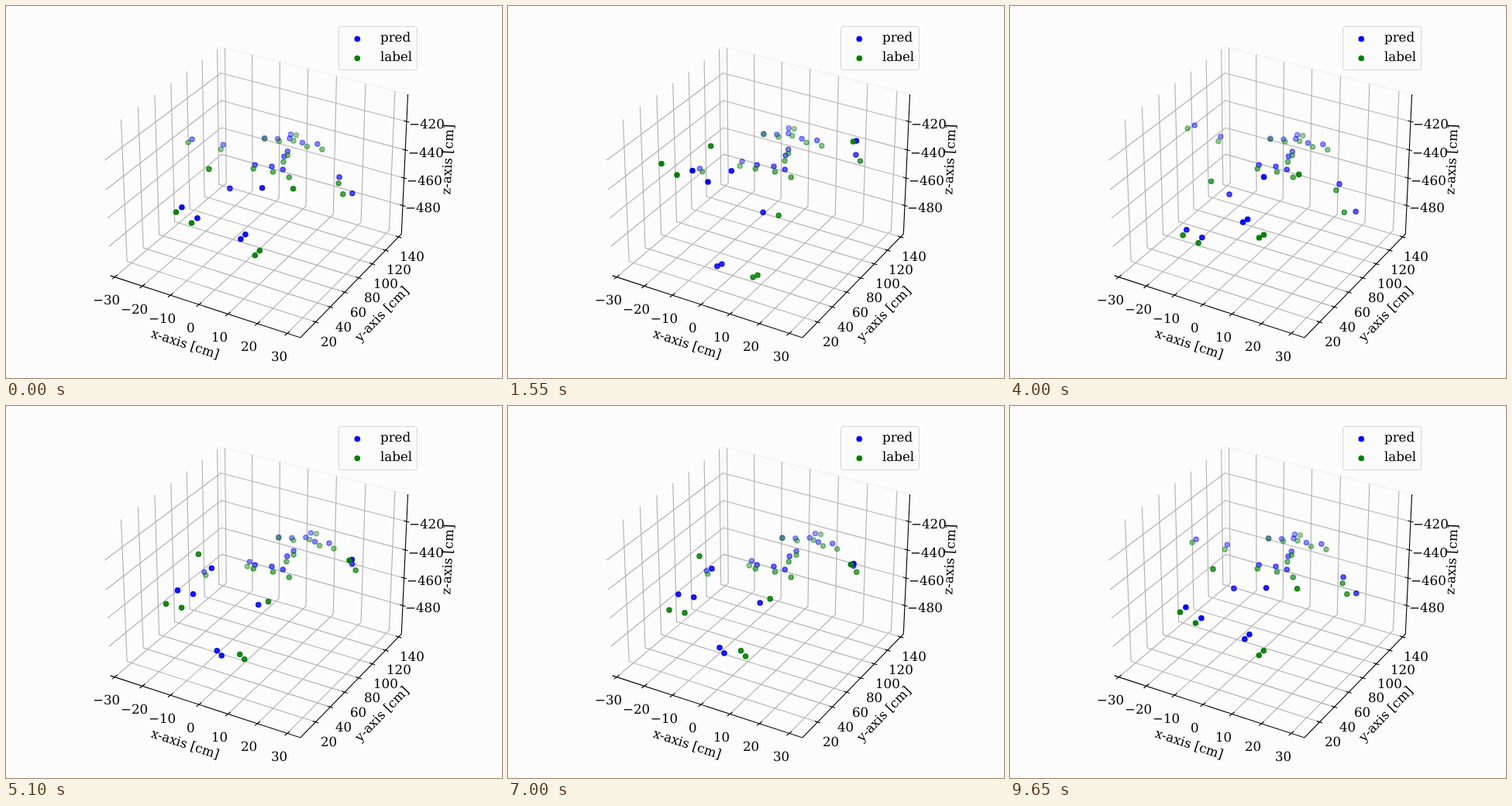
Write an HTML page that moves like this. It is 640 px wide and 480 px high and loops after 9700 ms.

```html
<!DOCTYPE html>
<html lang="en">
<head>
<meta charset="utf-8">
<title>Pose scatter</title>
<style>
html, body { margin: 0; width: 100%; height: 100%; overflow: hidden; background: #fcfcfc; }
svg { display: block; width: 640px; height: 480px; }
text { font: 16.67px "DejaVu Serif", serif; fill: #000; text-rendering: geometricPrecision; }
.grid { stroke: #b0b0b0; stroke-width: 1.11; fill: none; }
.axis { stroke: #000; stroke-width: 1.11; fill: none; }
.edge { stroke: #eee; stroke-width: 1; fill: none; }
.dot { stroke-width: 1.39; r: 3.1px; }
</style>
</head>
<body>
<svg id="stage" viewBox="0 0 640 480"></svg>
<script>
const stage = document.getElementById('stage');
const COLORS = { pred: '#0000ff', label: '#008000' };

function add(parent, tag, attrs, content) {
  const el = document.createElementNS('http://www.w3.org/2000/svg', tag);
  for (const k in attrs) el.setAttribute(k, attrs[k]);
  if (content) el.textContent = content;
  parent.appendChild(el);
  return el;
}
const group = () => add(stage, 'g', {});
const path = (parent, cls, ...pts) => add(parent, 'polyline', { class: cls, points: pts.join(' ') });
const dot = (parent, color, cx = 0, cy = 0) =>
  add(parent, 'circle', { class: 'dot', cx, cy, fill: color, stroke: color });

// Perspective view of a box around the origin: azimuth -60, elevation 30, distance 10.
const SIDE = 0.595, TOP = 0.446, ZOOM = 2362;
const S3 = Math.sqrt(3) / 2;
function project(x, y, z) {
  const right = S3 * x + y / 2;
  const up = -x / 4 + S3 / 2 * y + S3 * z;
  const near = S3 / 2 * x - 0.75 * y + z / 2;
  const k = ZOOM / (10 - near);
  return [325.9 + right * k, 231.3 - up * k];
}

function label(s, cx, cy) {
  const el = add(stage, 'text', {}, s);
  el.setAttribute('x', Math.round(cx - el.getComputedTextLength() / 2));
  el.setAttribute('y', Math.round(cy + 6));
}
const title = (s, x, y, angle) => add(stage, 'text',
  { 'text-anchor': 'middle', y: 6, transform: `translate(${x} ${y}) rotate(${angle})` }, s);

// Each tick has a grid line running from the axis over two walls.
const grid = group(), axes = group();
function ticks(from, to, step, walls, [ox, oy], [mx, my]) {
  for (let v = from; v <= to; v += step) {
    const pts = walls(v);
    const [x, y] = pts[0];
    path(grid, 'grid', ...pts);
    path(axes, 'axis', [x - mx, y - my], [x + mx, y + my]);
    label(String(v).replace('-', '−'), x + ox, y + oy);
  }
}

path(grid, 'edge', project(-SIDE, SIDE, -TOP), project(-SIDE, SIDE, TOP), project(SIDE, SIDE, TOP));
ticks(-30, 30, 10, v => {
  const x = 0.01804 * v - 0.0245;
  return [project(x, -SIDE, -TOP), project(x, SIDE, -TOP), project(x, SIDE, TOP)];
}, [-10.6, 29.6], [3.4, -2.6]);
ticks(20, 140, 20, v => {
  const y = 0.008232 * v - 0.5936;
  return [project(SIDE, y, -TOP), project(-SIDE, y, -TOP), project(-SIDE, y, TOP)];
}, [17.2, 25.2], [3.6, 1.2]);
ticks(-480, -420, 20, v => {
  const z = 0.008935 * (v + 451.16);
  return [project(SIDE, SIDE, z), project(-SIDE, SIDE, z), project(-SIDE, -SIDE, z)];
}, [26.4, 2.7], [3.6, 1]);
path(axes, 'axis', project(-SIDE, -SIDE, -TOP), project(SIDE, -SIDE, -TOP),
  project(SIDE, SIDE, -TOP), project(SIDE, SIDE, TOP));

title('x-axis [cm]', 231.5, 435.5, 18.1);
title('y-axis [cm]', 484.5, 397, -45.9);
title('z-axis [cm]', 569.5, 198, -87.3);

const layers = { pred: group(), label: group() };

add(stage, 'rect', { x: 429.5, y: 26.5, width: 101, height: 56, rx: 3,
  fill: '#fcfcfc', 'fill-opacity': 0.8, stroke: '#ccc', 'stroke-opacity': 0.8 });
Object.keys(COLORS).forEach((name, i) => {
  dot(stage, COLORS[name], 453.3, 42.5 + 25 * i);
  add(stage, 'text', { x: 483, y: 46 + 25 * i }, name);
});

// A gait wave: mean, cosine and sine over one stride, and a bounce per step.
const STRIDE = 1930, LOOP = 9700, STEP = 50;
function wave([mean, cos = 0, sin = 0, bounce = 0], p) {
  const a = 2 * Math.PI * p;
  return mean + cos * Math.cos(a) + sin * Math.sin(a) + bounce * Math.cos(2 * a - 2.2 * Math.PI);
}

const joints = [];
function joint(shade, x, y, dx, dy) {
  joints.push({ shade, x, y, dx, dy, label: dot(layers.label, COLORS.label), pred: dot(layers.pred, COLORS.pred) });
}

// Trunk joints share one sway; the prediction is off by a fixed error.
function trunk(x, y, sway, dx, dy) {
  joint([0.37 + 0.0045 * (y - 163)], [x, -18.5 * sway, 0, 9.8 * sway], [y, 0, 0, 4.5 * sway], [dx], [dy]);
}
trunk(385, 163, 1, -7, -1);       // head
trunk(379.5, 171, 0.8, -5, -3);   // neck
trunk(341, 169, 0.7, 0, -1);      // shoulders
trunk(360, 172, 0.7, -2, -3);
trunk(395, 179, 0.62, -6, -5);
trunk(414, 183, 0.58, -6, -7);
trunk(366.5, 191.5, 0.3, 0, -5);  // spine
trunk(359.5, 200.5, 0.15, 1, -7);
trunk(344.5, 214, 0, -1.5, -7);   // hips
trunk(319.3, 210, 0, 2, -5);
trunk(365.3, 221, 0, -8, -10);

// A foot is a heel and a toe that tilts around it.
function foot(shade, x, y, dx, dy, [tx, ...tilt]) {
  joint(shade, x, y, dx, dy);
  joint(shade, [x[0] + tx, ...x.slice(1)], y.map((v, i) => v + (tilt[i] || 0)), dx, dy);
}

// left elbow, wrist, knee, foot
joint([.42], [285, -11, -23, 4], [185.5, -2, -25, 2], [3], [-6]);
joint([.46], [240.5, -7, -15.6, 2], [178.5, -6, -44, 4.4], [5, 0, 9], [-4]);
joint([.76, 0, -.14], [254, 10, -2, -2.6], [215.4, -5, 35, 0], [18, 9, -6], [13, 12, -16]);
foot([.86, .11, -.15], [210.5, 3, 6.4, 7.4], [279.5, -24.5, 57.5, 13.6],
  [22, 0, 0, -18], [-3, 8, 5, -14], [20, 5, 9, -7]);

// right elbow, wrist, knee, foot
joint([.65, 0, -.05], [435.5, -4, -18.4, -3], [223.5, 0, 18, 6.5], [1, 0, 7], [-8]);
joint([.82, -.12, -.16], [437, -1, -7.7, -1.5], [233.4, 0, 49.6, 11.6], [10, 2, 7], [-1]);
joint([.92, -.03, .1], [353.5, 15.5, 7.8, 2], [228.4, 9, -39, -2], [-30, -10, -14], [6, -7, 8]);
foot([.98, -.04, .13], [313, 11, 4, -3.3], [298.7, 23, -46.4, 0],
  [-40, 7, -10, 18], [-11, -10], [6, 3, -9, 3]);

function place(el, x, y, alpha) {
  el.setAttribute('cx', x.toFixed(2));
  el.setAttribute('cy', y.toFixed(2));
  el.setAttribute('opacity', 1);
  el.setAttribute('fill-opacity', alpha);
  el.setAttribute('stroke-opacity', alpha);
}

function draw(t) {
  const p = t / STRIDE;
  for (const j of joints) {
    const x = wave(j.x, p), y = wave(j.y, p);
    const alpha = Math.min(1, wave(j.shade, p));
    place(j.label, x, y, alpha);
    place(j.pred, x + wave(j.dx, p), y + wave(j.dy, p), alpha);
  }
}

const begin = performance.now();
function frame() {
  const t = (performance.now() - begin) % LOOP;
  draw(Math.floor(t / STEP) * STEP);
  requestAnimationFrame(frame);
}
draw(0);
requestAnimationFrame(frame);
</script>
</body>
</html>
```
